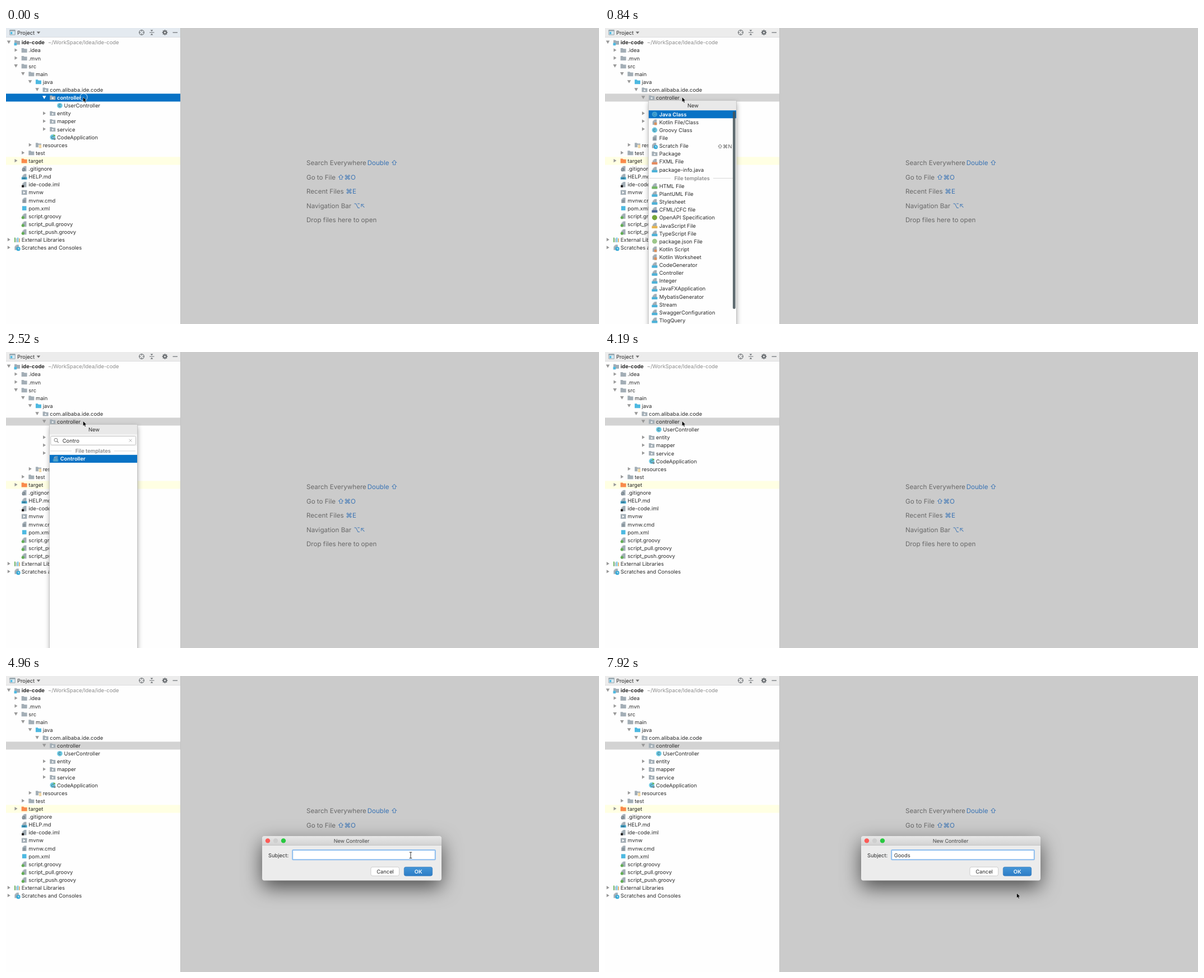
Animation of 1058 by 529 pixels, one loop 8 s. Source, as an HTML page with a canvas:

```html
<!DOCTYPE html>
<html lang="en">
<head>
<meta charset="utf-8">
<style>
html, body { margin: 0; height: 100%; overflow: hidden; background: #cbcbcb; }
canvas { display: block; }
</style>
</head>
<body>
<canvas id="stage" width="1058" height="529"></canvas>
<script>
const c = document.getElementById('stage').getContext('2d');
const LOOP = 8000, ROW = 14.11;
const INK = '#2b2b2b', GREY = '#a3aeb6', BLUE = '#0872c5', SKY = '#4db9e1', GREEN = '#62ad54';

// depth, label, icon, fold state (1 open, 0 closed)
const TREE = [
  [0, 'ide-code', 'module', 1], [1, '.idea', 'folder', 0], [1, '.mvn', 'folder', 0],
  [1, 'src', 'folder', 1], [2, 'main', 'folder', 1], [3, 'java', 'source', 1],
  [4, 'com.alibaba.ide.code', 'package', 1], [5, 'controller', 'package', 1],
  [6, 'UserController', 'class'], [5, 'entity', 'package', 0], [5, 'mapper', 'package', 0],
  [5, 'service', 'package', 0], [5, 'CodeApplication', 'app'], [3, 'resources', 'resources', 0],
  [2, 'test', 'folder', 0], [1, 'target', 'target', 0], [1, '.gitignore', 'ignored'],
  [1, 'HELP.md', 'markdown'], [1, 'ide-code.iml', 'iml'], [1, 'mvnw', 'shell'],
  [1, 'mvnw.cmd', 'text'], [1, 'pom.xml', 'pom'], [1, 'script.groovy', 'groovy'],
  [1, 'script_pull.groovy', 'groovy'], [1, 'script_push.groovy', 'groovy'],
  [0, 'External Libraries', 'libs', 0], [0, 'Scratches and Consoles', 'scratch', 0]
];
const NEW_FILES = [
  ['Java Class', 'class'], ['Kotlin File/Class', 'kotlin'], ['Groovy Class', 'class'],
  ['File', 'text'], ['Scratch File', 'scratch'], ['Package', 'package'],
  ['FXML File', 'markup'], ['package-info.java', 'java']
];
const TEMPLATES = [
  ['HTML File', 'html'], ['PlantUML File', 'java'], ['Stylesheet', 'java'], ['CFML/CFC file', 'cfml'],
  ['OpenAPI Specification', 'openapi'], ['JavaScript File', 'js'], ['TypeScript File', 'java'],
  ['package.json File', 'node'], ['Kotlin Script', 'kotlin'], ['Kotlin Worksheet', 'kotlin'],
  ...['CodeGenerator', 'Controller', 'Integer', 'JavaFXApplication', 'MybatisGenerator',
    'Stream', 'SwaggerConfiguration', 'TlogQuery'].map(name => [name, 'java'])
];

// Step tracks: [start time, value]
const QUERY = [[0, ''], [1800, 'C'], [1920, 'Co'], [2160, 'Con'], [2280, 'Contr'], [2520, 'Contro']];
const SUBJECT = [[0, ''], [6390, 'G'], [6980, 'Go'], [7100, 'Goo'], [7220, 'Good'], [7330, 'Goods']];
const CARET = [[0, false], [5080, true], [5560, false], [5910, true], [7800, false]];
const POINTER = [
  [0, [137.5, 123.5]], [4840, [770, 353]], [4960, [722, 320]], [5080, [702, 321]], [5200, [686, 322]],
  [5320, [674, 324]], [5440, [665, 326]], [5560, [659, 328]], [5670, [657, 325]], [5790, [654, 322]],
  [5910, [652, 320]], [6030, [650.5, 318.7]], [7680, [672, 336]], [7800, [716, 374]], [7920, [734.5, 388]]
];
const at = (track, t) => track.findLast(step => step[0] <= t)[1];

function text(s, x, y, color = INK, size = 9.4, weight = 400, align = 'left') {
  c.font = `${weight} ${size}px Inter, "DejaVu Sans", sans-serif`;
  c.textRendering = 'geometricPrecision';
  c.textAlign = align;
  c.textBaseline = 'alphabetic';
  c.fillStyle = color;
  c.fillText(s, x, y + size * 0.38);
}
function rect(x, y, w, h, color) {
  c.fillStyle = color;
  c.fillRect(x, y, w, h);
}
function box(x, y, w, h, r, fill, stroke, width = 1) {
  c.beginPath();
  c.roundRect(x, y, w, h, r);
  if (fill) { c.fillStyle = fill; c.fill(); }
  if (stroke) { c.strokeStyle = stroke; c.lineWidth = width; c.stroke(); }
}
function disc(x, y, r, color) {
  c.beginPath();
  c.arc(x, y, r, 0, 7);
  c.fillStyle = color;
  c.fill();
}
function ring(x, y, r, color, width = 1) {
  c.beginPath();
  c.arc(x, y, r, 0, 7);
  c.strokeStyle = color;
  c.lineWidth = width;
  c.stroke();
}
function poly(color, ...points) {
  c.beginPath();
  for (let i = 0; i < points.length; i += 2) c.lineTo(points[i], points[i + 1]);
  c.closePath();
  c.fillStyle = color;
  c.fill();
}
function line(color, width, ...points) {
  c.beginPath();
  for (let i = 0; i < points.length; i += 2) c.lineTo(points[i], points[i + 1]);
  c.strokeStyle = color;
  c.lineWidth = width;
  c.stroke();
}

const folder = (x, y, color) => poly(color, x - 5, y - 4, x - 1.2, y - 4, x, y - 2.7,
  x + 5, y - 2.7, x + 5, y + 4, x - 5, y + 4);
function page(x, y) {
  poly(GREY, x + 0.3, y - 4.8, x + 3.8, y - 4.8, x + 3.8, y + 4.8, x - 3.6, y + 4.8, x - 3.6, y - 1);
  poly('#bcc5cb', x - 0.5, y - 4.8, x - 0.5, y - 1.8, x - 3.6, y - 1.8);
}
function letterDisc(x, y) {
  disc(x, y, 4.8, '#6cc8e2');
  text('C', x, y, '#3f6675', 6.6, 500, 'center');
}
function badgedPage(x, y, color) {
  page(x, y);
  rect(x - 5, y + 0.8, 10, 4.3, color);
}

const ICONS = {
  folder: (x, y) => folder(x, y, GREY),
  source: (x, y) => folder(x, y, SKY),
  target: (x, y) => folder(x, y, '#f98a4b'),
  module(x, y) {
    folder(x, y, GREY);
    rect(x - 5.5, y + 0.8, 4.6, 4.6, SKY);
  },
  package(x, y) {
    folder(x, y, GREY);
    disc(x, y + 0.8, 1.6, '#eef1f3');
  },
  resources(x, y) {
    folder(x, y, GREY);
    rect(x, y - 0.6, 6, 6, '#fff');
    for (let i = 0; i < 3; i++) rect(x + 0.8, y + i * 2, 4.5, 1, '#e6b050');
  },
  class: letterDisc,
  app(x, y) {
    letterDisc(x, y);
    poly(GREEN, x + 1.5, y - 5.2, x + 5.5, y - 3, x + 1.5, y - 0.8);
    disc(x + 3.4, y + 3.2, 2, '#7f9099');
  },
  text(x, y) {
    page(x, y);
    for (let i = 0; i < 3; i++) rect(x - 2.2, y - 0.4 + i * 1.8, 4.6, 0.7, '#66737c');
  },
  ignored(x, y) {
    page(x, y);
    ring(x - 1.2, y + 1.6, 2.5, '#66737c');
    line('#66737c', 1, x - 3, y + 3.4, x + 0.6, y - 0.2);
  },
  markdown(x, y) {
    badgedPage(x, y, '#4bb1d8');
    text('MD', x, y + 3, '#1f4a5c', 4, 600, 'center');
  },
  iml(x, y) {
    page(x, y);
    rect(x - 4.6, y + 1, 4, 4, '#222');
  },
  shell(x, y) {
    rect(x - 4.8, y - 4.2, 9.6, 8.4, GREY);
    poly('#fff', x - 1.8, y - 2.3, x + 1.8, y, x - 1.8, y + 2.3);
  },
  pom: (x, y) => rect(x - 3.8, y - 3.8, 7.6, 7.6, SKY),
  groovy(x, y) {
    page(x, y);
    disc(x - 2.4, y + 2.6, 2.6, GREEN);
  },
  libs(x, y) {
    [GREEN, GREY, SKY, '#d9a85a'].forEach((color, i) =>
      rect(x - 5 + i * 2.7, y - 4 + (i % 2) * 1.5, 1.7, 8.3 - (i % 2) * 1.5, color));
  },
  scratch(x, y) {
    page(x - 1, y - 0.6);
    disc(x + 2, y + 2, 3.6, '#35a9d6');
    line('#fff', 0.9, x + 2, y, x + 2, y + 2.2, x + 3.8, y + 2.2);
  },
  java: (x, y) => badgedPage(x, y, '#4bb1d8'),
  markup: (x, y) => badgedPage(x, y, '#e58a5f'),
  html: (x, y) => badgedPage(x, y, '#73b565'),
  js: (x, y) => badgedPage(x, y, '#e6b550'),
  cfml: (x, y) => badgedPage(x, y, '#4a6c9c'),
  kotlin(x, y) {
    page(x, y);
    rect(x - 0.6, y + 0.6, 4.6, 4.6, '#d98f5c');
  },
  openapi: (x, y) => disc(x, y, 4.6, '#74a63b'),
  node: (x, y) => disc(x, y, 4.4, '#9cc78a')
};

function drawHeader(active) {
  rect(0, 0, 311, 16.5, active ? '#e4eaf0' : '#ececec');
  rect(0, 16.3, 311, 0.7, '#d3d5d7');
  box(6.8, 3.8, 9.4, 8.4, 0, '#d6e9f1', '#98a6ae');
  rect(6.5, 3.3, 10, 2.4, '#98a6ae');
  rect(8.2, 7, 3, 4, SKY);
  text('Project', 20, 8);
  poly('#6e6e6e', 54.8, 6.6, 61.2, 6.6, 58, 10.4);

  const tool = '#6a6e72';
  ring(242, 8, 4.3, tool, 1.1);
  for (const d of [-1, 1]) {
    line(tool, 1.1, 242 + d * 5, 8, 242 + d * 1.6, 8);
    line(tool, 1.1, 242, 8 + d * 5, 242, 8 + d * 1.6);
    poly(tool, 257.6, 8 + d * 4.5, 262.4, 8 + d * 4.5, 260, 8 + d * 1.8);
  }
  line(tool, 1, 256, 8, 264.5, 8);
  for (let i = 0; i < 4; i++) {
    const a = i * Math.PI / 4, dx = Math.cos(a) * 4.8, dy = Math.sin(a) * 4.8;
    line(tool, 1.9, 283.5 - dx, 8 - dy, 283.5 + dx, 8 + dy);
  }
  disc(283.5, 8, 3.5, tool);
  disc(283.5, 8, 1.5, '#ececec');
  rect(297.5, 7.5, 8.5, 1.2, tool);
}

function drawTree(active) {
  rect(0, 0, 311, 529, '#fefefe');
  rect(311, 0, 1, 529, '#c2c2c2');
  drawHeader(active);
  TREE.forEach(([depth, label, icon, open], i) => {
    const y = 25.8 + i * ROW, x = 5 + depth * 12.65;
    const selected = label === 'controller', lit = selected && active;
    if (selected) rect(0, y - 7.2, 311, ROW, active ? BLUE : '#d3d3d3');
    if (label === 'target') rect(0, y - 7, 311, ROW, '#ffffe3');
    const fold = lit ? '#fff' : '#989898';
    if (open === 1) poly(fold, x - 3.3, y - 3.2, x + 3.3, y - 3.2, x, y + 2.5);
    if (open === 0) poly(fold, x - 2.2, y - 3.5, x + 2.8, y - 0.4, x - 2.2, y + 2.7);
    ICONS[icon](x + 15, y);
    text(label, x + 22.7, y, lit ? '#fff' : INK, 9.4, i ? (lit ? 600 : 400) : 700);
  });
  text('~/WorkSpace/Idea/ide-code', 75, 25.8, '#8b8b8b');
}

function drawHints() {
  const hints = [
    ['Search Everywhere', 'Double ⇧', 644.7], ['Go to File', '⇧⌘O', 591.5],
    ['Recent Files', '⌘E', 606.3], ['Navigation Bar', '⌥↖', 620.2], ['Drop files here to open', '', 0]
  ];
  hints.forEach(([label, keys, x], i) => {
    const y = 241 + i * 25.4;
    text(label, 536, y, '#696969', 11.6);
    text(keys, x, y, '#3a74b5', 11.6);
  });
}

function drawSeparator(y, right) {
  rect(79, y, 38, 0.8, '#cfcfcf');
  rect(193, y, right - 193, 0.8, '#cfcfcf');
  text('File templates', 155.3, y, '#8c8c8c', 9.4, 600, 'center');
}
function drawItem([label, icon], y, selected) {
  if (selected) rect(78, y - 7, 156, ROW, BLUE);
  c.globalAlpha = selected ? 0.55 : 1;
  ICONS[icon](88.5, y);
  c.globalAlpha = 1;
  text(label, 96.7, y, selected ? '#fff' : INK, 9.4, selected ? 600 : 400);
}
function drawPopup(query) {
  c.save();
  c.shadowColor = 'rgba(0,0,0,.38)';
  c.shadowBlur = 9;
  c.shadowOffsetY = 3;
  rect(77.5, 129.5, 157, 420, '#fefefe');
  c.restore();
  rect(77.5, 129.5, 157, 17.5, '#e9e9e9');
  text('New', 157, 138.6, INK, 9.4, 400, 'center');
  if (!query) {
    NEW_FILES.forEach((item, i) => drawItem(item, 154.2 + i * ROW, i === 0));
    text('⇧⌘N', 226.5, 211, '#5c5c5c', 9.4, 400, 'right');
    drawSeparator(268, 228);
    TEMPLATES.forEach((item, i) => drawItem(item, 282.4 + i * ROW, false));
    box(228, 149, 4.8, 353, 2, 'rgba(70,84,90,.85)');
  } else {
    rect(77.5, 147, 157, 21, '#f4f4f4');
    box(79.8, 150.5, 151.7, 15.6, 2, '#fff', '#c3c3c3');
    ring(89, 157.3, 3, '#7b7b7b');
    line('#7b7b7b', 1.1, 91.1, 159.5, 93.8, 162.2);
    text(query, 100.7, 158.2);
    line('#adadad', 0.9, 219.6, 155.6, 224.6, 160.6);
    line('#adadad', 0.9, 224.6, 155.6, 219.6, 160.6);
    drawSeparator(176.5, 231);
    TEMPLATES.filter(([name]) => name.includes(query))
      .sort(([a], [b]) => b.startsWith(query) - a.startsWith(query))
      .forEach((item, i) => drawItem(item, 190.8 + i * ROW, i === 0));
  }
  c.strokeStyle = '#b9b9b9';
  c.lineWidth = 0.7;
  c.strokeRect(77.5, 129.5, 157, 420);
}

function vertical(y, h, top, bottom) {
  const g = c.createLinearGradient(0, y, 0, y + h);
  g.addColorStop(0, top);
  g.addColorStop(1, bottom);
  return g;
}
function drawDialog(t) {
  c.save();
  c.shadowColor = 'rgba(0,0,0,.62)';
  c.shadowBlur = 35;
  c.shadowOffsetY = 12;
  box(457, 286.3, 320, 79.2, 4, '#ececec');
  c.restore();
  box(457, 286.3, 320, 16, [4, 4, 0, 0], vertical(286, 16, '#e8e8e8', '#d3d3d3'));
  rect(457, 302, 320, 0.7, '#b8b8b8');
  ['#fc5b57', '#cfcfcf', '#28c840'].forEach((color, i) => disc(467 + i * 14, 294.4, 4.2, color));
  text('New Controller', 616.5, 294.5, '#454545', 9, 400, 'center');
  if (t < 4480) return;

  text('Subject:', 468, 320);
  box(511.2, 310.9, 254.6, 17.4, 1, '#fff', '#8dbdee', 2);
  const subject = at(SUBJECT, t);
  text(subject, 515.7, 320);
  if (at(CARET, t)) rect(515.7 + c.measureText(subject).width, 314, 0.9, 11.5, '#222');
  box(651, 341.4, 50.5, 15.8, 3, '#fff', '#c4c4c4', 0.8);
  text('Cancel', 676.5, 349.4, INK, 9.4, 400, 'center');
  box(710.3, 341.4, 50.4, 15.8, 3, vertical(341, 16, '#4596d8', '#2d7dc6'), '#3278b8', 0.7);
  text('OK', 735.7, 349.4, '#fff', 9.4, 600, 'center');
}

function drawPointer(x, y) {
  if (x > 511 && y > 310 && y < 329) {
    line('#333', 1, x, y - 5, x, y + 5.5);
    for (const dy of [-5, 5.5]) line('#333', 1, x - 2.3, y + dy, x + 2.3, y + dy);
    return;
  }
  poly('#000', x, y, x, y + 8.8, x + 2, y + 7, x + 3.4, y + 10, x + 4.9, y + 9.3, x + 3.6, y + 6.4, x + 6.2, y + 6.2);
  c.strokeStyle = 'rgba(255,255,255,.8)';
  c.lineWidth = 0.6;
  c.stroke();
}

function draw(now) {
  const t = now % LOOP;
  rect(0, 0, 1058, 529, '#cbcbcb');
  drawHints();
  drawTree(t < 720);
  if (t >= 720 && t < 4190) drawPopup(at(QUERY, t));
  if (t >= 4310) drawDialog(t);
  if (t < 120) ring(138.5, 123.7, 6.6, '#d5e3ee');
  drawPointer(...at(POINTER, t));
  requestAnimationFrame(draw);
}
requestAnimationFrame(draw);
</script>
</body>
</html>
```
